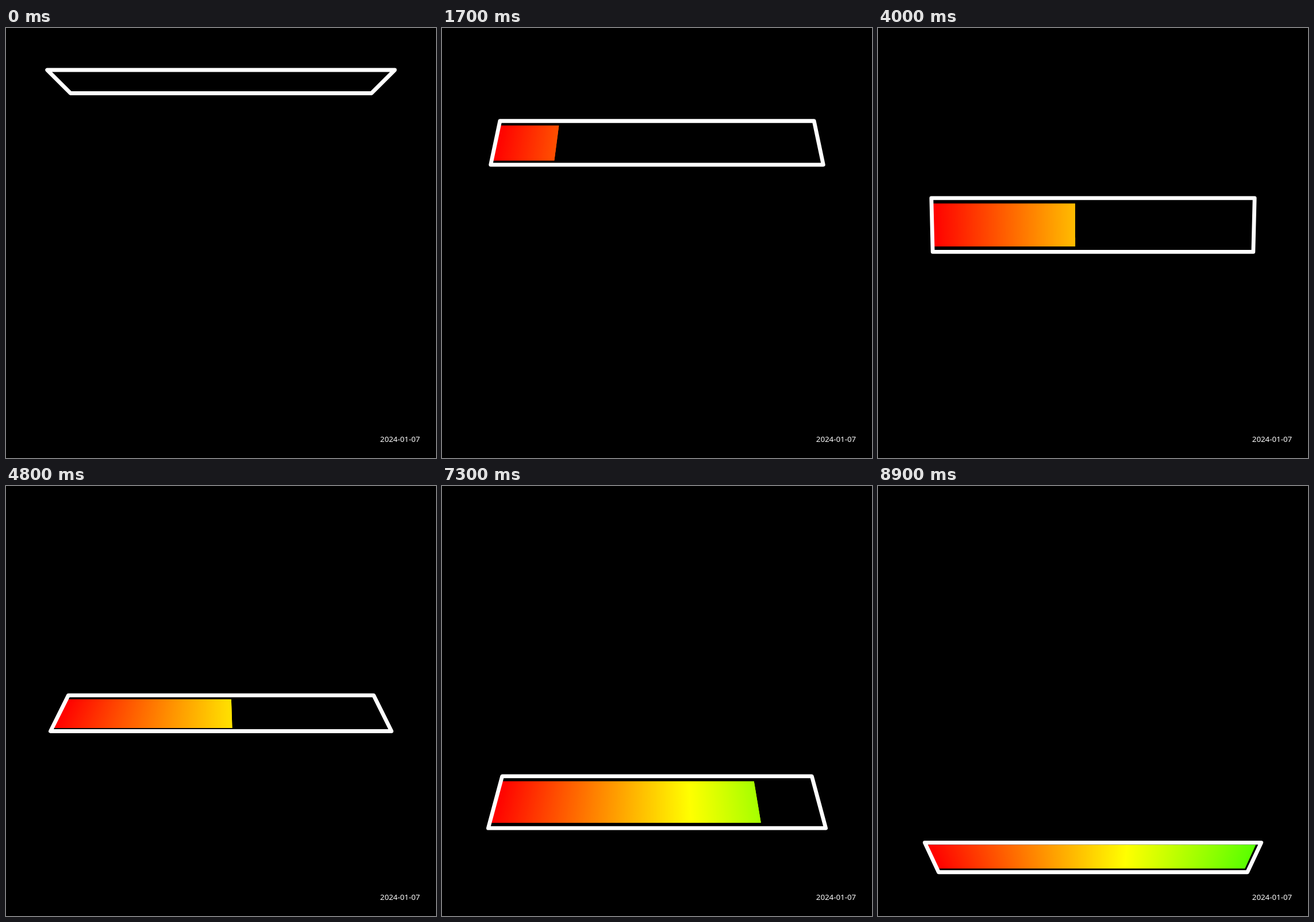
An HTML page with a canvas for the animation above (9000 ms loop, 748 by 748 pixels).

```html
<!DOCTYPE html>
<html lang="en">
<head>
<meta charset="utf-8">
<style>
  html, body { margin: 0; height: 100%; overflow: hidden; background: #000; }
  canvas { display: block; }
</style>
</head>
<body>
<canvas id="stage" width="748" height="748"></canvas>
<script>
const SIZE = 748, MID = SIZE / 2, STEPS = 90;
const HALF_W = SIZE * 0.375, HALF_H = SIZE / 16, FILL_H = SIZE / 20;
const EYE = MID / Math.tan(Math.PI / 6);
const STRIPS = 270;
const ctx = document.getElementById('stage').getContext('2d');

// Project a point of the tilted bar onto the stage.
function project(x, y, z, centerY, tilt) {
  const c = Math.cos(tilt), s = Math.sin(tilt);
  const scale = EYE / (EYE + y * s - z * c);
  return [MID + x * scale, MID + (centerY + y * c + z * s) * scale];
}

function quad(x0, x1, h, z, centerY, tilt) {
  ctx.beginPath();
  for (const [x, y] of [[x0, -h], [x1, -h], [x1, h], [x0, h]])
    ctx.lineTo(...project(x, y, z, centerY, tilt));
  ctx.closePath();
}

function draw(step) {
  const progress = step / STEPS;
  const centerY = HALF_W * (2 * progress - 1);
  const tilt = Math.PI / 2 - step * Math.PI / 27;
  const xAt = p => HALF_W * (2 * p - 1);

  ctx.fillStyle = '#000';
  ctx.fillRect(0, 0, SIZE, SIZE);

  const depth = Math.cos(tilt) < 0 ? 3 : 0;
  for (let i = 0; i < progress * STRIPS; i++) {
    // Strips overlap so that no seams show.
    const end = Math.min(progress, (i + 2) / STRIPS);
    quad(xAt(i / STRIPS), xAt(end), FILL_H, depth, centerY, tilt);
    ctx.fillStyle = `hsl(${100 * i / STRIPS} 100% 50%)`;
    ctx.fill();
  }

  quad(-HALF_W, HALF_W, HALF_H, 1.2, centerY, tilt);
  ctx.strokeStyle = '#fff';
  ctx.lineWidth = 6.8;
  ctx.lineJoin = 'round';
  ctx.stroke();

  ctx.fillStyle = '#fff';
  ctx.font = '13.3px "Noto Sans", "Open Sans", sans-serif';
  ctx.textAlign = 'right';
  ctx.fillText('2024-01-07', 720.2, 720);
}

function tick() {
  draw(Math.floor(performance.now() / 100) % STEPS);
  requestAnimationFrame(tick);
}
tick();
</script>
</body>
</html>
```
